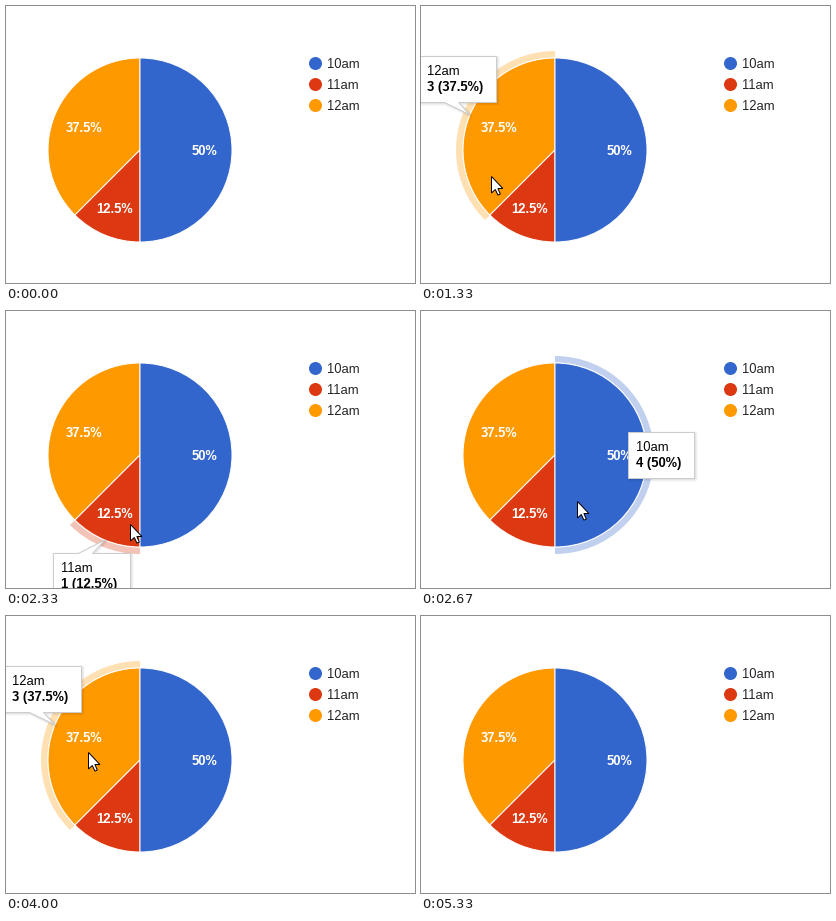
Recreate the animation shown at these times as a matplotlib script. Size 409 by 277 pixels, loop 5990 ms.

```python
import math

import matplotlib.pyplot as plt
import numpy as np
from matplotlib.animation import FuncAnimation
from matplotlib.patches import Circle, Polygon, Wedge

W, H, DPI = 409, 277, 64
LOOP_MS, FRAMES = 5990, 90
CX, CY, R = 134, 144, 92
TIP_H = 46

# name, value, colour, label centre
DATA = [
    ("10am", 4, "#3366cc", (198, 144)),
    ("11am", 1, "#dc3912", (108, 202)),
    ("12am", 3, "#ff9900", (78.5, 121)),
]
TOTAL = sum(d[1] for d in DATA)

# pointer stops: arrival step, steps of rest, x, y
STOPS = [
    (1, 0, 42, 258), (6, 0, 70, 178), (10, 9, 70, 170), (24, 0, 90, 207),
    (30, 0, 101, 215), (35, 0, 124, 213), (41, 11, 162, 185), (56, 0, 138, 128),
    (60, 0, 82, 136), (68, 1, 116, 194), (74, 4, 160, 188), (79, 0, 124, 222),
]
PATH = np.array([(step + d, x, y) for step, rest, x, y in STOPS
                 for d in sorted({0, rest})])
ARROW = np.array([(0, 0), (0, 16.5), (3.8, 13), (6.4, 18.6), (8.8, 17.6),
                  (6.4, 12), (11.4, 12)])

plt.rcParams["font.family"] = "Liberation Sans"
plt.rcParams["text.hinting"] = "native"
fig = plt.figure(figsize=(W / DPI, H / DPI), dpi=DPI, facecolor="white")
ax = fig.add_axes([0, 0, 1, 1])
ax.set_xlim(0, W)
ax.set_ylim(H, 0)
ax.axis("off")


def px(n):
    return n * 72 / DPI


def write(x, base, s, color, weight="normal", ha="left", z=4):
    return ax.text(x, base, s, color=color, size=px(13), weight=weight,
                   ha=ha, va="baseline", zorder=z)


def tooltip(name, text, angle):
    """Box beside the middle of the slice's rim, with a tail above or below."""
    a = math.radians(angle)
    rim = (CX + R * math.cos(a), CY + R * math.sin(a))
    side = round(math.copysign(1, math.sin(a))) if abs(math.sin(a)) > 0.1 else 0
    left = round(rim[0] - (51.3 if side else 19))
    top = round(rim[1] + side * (13 + TIP_H / 2) - TIP_H / 2)

    bold = write(left + 8, top + 35, text, "black", "bold", z=7)
    plain = write(left + 8, top + 19, name, "black", z=7)
    x0, y0 = left + 0.5, top + 0.5
    x1 = x0 + round(bold.get_window_extent().width + 21)
    y1 = y0 + TIP_H

    pts = [(x0, y0), (x1, y0), (x1, y1), (x0, y1)]
    tail_a, tail_b = x0 + 25, x0 + 39
    if side > 0:
        pts[1:1] = [(tail_a, y0), rim, (tail_b, y0)]
    elif side < 0:
        pts[3:3] = [(tail_b, y1), rim, (tail_a, y1)]
    pts = np.array(pts)

    shadows = [Polygon(pts + 1, fc="none", ec="black", alpha=0.035, lw=px(w),
                       joinstyle="round", snap=False, zorder=5)
               for w in (1, 2.5, 4)]
    box = Polygon(pts, fc="white", ec="#cccccc", lw=px(1), snap=False, zorder=6)
    return [ax.add_patch(p) for p in shadows + [box]] + [plain, bold]


spans, hovers = [], []
start = -90
for i, (name, value, color, mid) in enumerate(DATA):
    end = start + 360 * value / TOTAL
    share = f"{100 * value / TOTAL:g}%"
    ax.add_patch(Wedge((CX, CY), R, start, end, fc=color, ec="white",
                       lw=px(1), zorder=3 - i / 10))
    write(mid[0], mid[1] + 5, share, "white", "bold", "center")

    row = 57.5 + 21 * i
    ax.add_patch(Circle((309.5, row), 6.5, fc=color, lw=0))
    write(321, row + 4.5, name, "#222222")

    ring = ax.add_patch(Wedge((CX, CY), R + 7, start, end, width=6.5,
                              fc=color, alpha=0.3, lw=0, zorder=1))
    hovers.append([ring] + tooltip(name, f"{value} ({share})", (start + end) / 2))
    spans.append((start, end))
    start = end

pointer = ax.add_patch(Polygon(ARROW, fc="white", ec="black", lw=px(1),
                               joinstyle="miter", zorder=10))


def slice_at(x, y):
    dx, dy = x - CX, y - CY
    if math.hypot(dx, dy) > R:
        return None
    angle = (math.degrees(math.atan2(dy, dx)) + 90) % 360 - 90
    return next(i for i, (a, b) in enumerate(spans) if a <= angle <= b)


def update(k):
    shown = bool(PATH[0, 0] <= k <= PATH[-1, 0])
    x, y = (round(float(np.interp(k, PATH[:, 0], PATH[:, c]))) for c in (1, 2))
    pointer.set_visible(shown)
    pointer.set_xy(ARROW + (x + 0.5, y + 0.5))
    active = slice_at(x, y) if shown else None
    for i, parts in enumerate(hovers):
        for part in parts:
            part.set_visible(i == active)
    return [pointer]


anim = FuncAnimation(fig, update, frames=FRAMES, init_func=lambda: update(0),
                     interval=LOOP_MS / FRAMES, repeat=True, repeat_delay=0)
plt.show()
```
